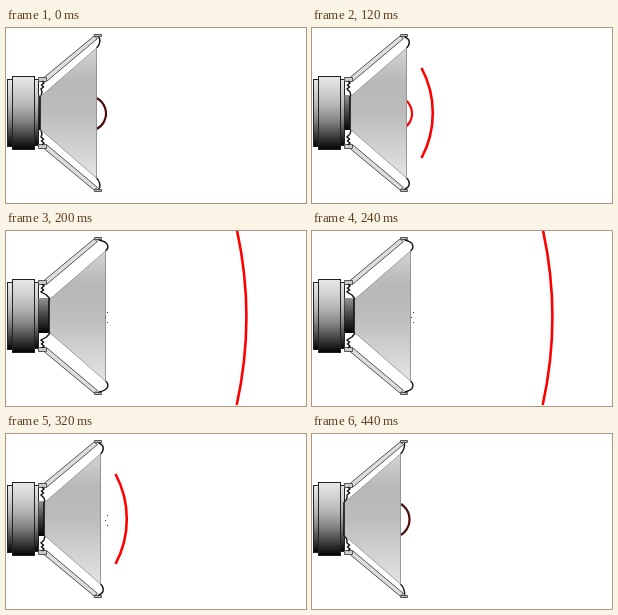
Write an HTML page with a canvas that moves like this. It is 300x175 px and loops after 480 ms.

```html
<!DOCTYPE html>
<html lang="en">
<head>
<meta charset="utf-8">
<title>Loudspeaker</title>
<style>
html, body { margin: 0; width: 100%; height: 100%; overflow: hidden; background: #fff; }
canvas { display: block; width: 300px; height: 175px; }
</style>
</head>
<body>
<canvas id="stage" width="300" height="175"></canvas>
<script>
const g = document.getElementById('stage').getContext('2d');
const STEP = 40, MID = 85;
const RED = '#f00', DARK = '#4a0c0c';

// One row per step: cone edge x, dome tip x, dome colour, wave index
const steps = [
  [91, 100, DARK, 0],
  [93, 100, DARK, 0],
  [95, 100, RED, 1],
  [95, 100, RED, 1],
  [99, 100, RED, 2],
  [100, 0, '', 2],
  [99, 0, '', 2],
  [95, 0, '', 1],
  [95, 0, '', 1],
  [93, 100, DARK, 0],
  [91, 100, DARK, 0],
  [89, 97.5, DARK, 0]
];

// Tip x, depth of the bow, half height, centre y
const waves = [null, [120.8, 11.3, 45, 85], [240.3, 9.6, 88, 86]];

function line(points, color, width = 1) {
  g.beginPath();
  points.forEach(([x, y]) => g.lineTo(x, y));
  g.strokeStyle = color;
  g.lineWidth = width;
  g.stroke();
}

function shape(points, fill, edge) {
  g.beginPath();
  points.forEach(([x, y]) => g.lineTo(x, y));
  g.closePath();
  g.fillStyle = fill;
  g.fill();
  if (edge) {
    g.strokeStyle = edge;
    g.lineWidth = 1;
    g.stroke();
  }
}

function bow(tip, depth, half, cy, color, width) {
  const r = (half * half + depth * depth) / (2 * depth);
  const a = Math.asin(half / r);
  g.beginPath();
  g.arc(tip - r, cy, r, -a, a);
  g.strokeStyle = color;
  g.lineWidth = width;
  g.stroke();
}

function shade(y0, y1, colors) {
  const fill = g.createLinearGradient(0, y0, 0, y1);
  colors.forEach((c, i) => fill.addColorStop(i / (colors.length - 1), c));
  return fill;
}

function mirrored(draw) {
  draw();
  g.save();
  g.translate(0, 2 * MID);
  g.scale(1, -1);
  draw();
  g.restore();
}

function block(x, y, w, h) {
  g.fillStyle = shade(y, y + h, ['#e8e8e8', '#d2d2d2', '#b4b4b4', '#858585', '#444', '#000']);
  g.fillRect(x, y, w, h);
  g.strokeStyle = '#222';
  g.lineWidth = 1;
  g.strokeRect(x + 0.5, y + 0.5, w - 1, h - 1);
}

function frameHalf(edge) {
  const neck = edge - 57;
  // basket
  shape([[38, 49.5], [88, 8], [91.5, 10.5], [41, 53]], '#ddd', '#555');
  shape([[32.5, 49.5], [40.5, 49.5], [40.5, 53.5], [32.5, 53.5]], '#ccc', '#555');
  shape([[88.5, 6.5], [95.5, 6.5], [95.5, 8.5], [88.5, 8.5]], '#bbb', '#555');
  // spider
  line([[36, 53], [38, 55], [35.5, 57], [37.5, 59], [35, 61], [(neck + 38) / 2, 64], [neck + 1, 68]], '#111', 1.4);
  // surround
  g.beginPath();
  g.moveTo(92.5, 9);
  g.bezierCurveTo(edge + 4, 11, edge + 3, 17, edge - 0.5, 20);
  g.strokeStyle = '#111';
  g.lineWidth = 1.4;
  g.stroke();
}

function draw([edge, tip, tint, wave]) {
  const neck = edge - 57;
  g.fillStyle = '#fff';
  g.fillRect(0, 0, 300, 175);

  if (tip) bow(tip, tip - 90.5 + (edge < 90 ? 1.5 : 0), 15.5, 85.5, tint, 2.2);

  block(1, 51, 6, 68);
  block(28, 51, 5, 67);
  block(6, 48, 23, 74);

  g.fillStyle = shade(66, 103, ['#999', '#444', '#000']);
  g.fillRect(32.5, 67, neck - 32, 35);

  mirrored(() => frameHalf(edge));

  const cone = shade(20, 150, ['#d4d4d4', '#b8b8b8', '#bcbcbc', '#d0d0d0', '#e4e4e4']);
  shape([[neck, 69], [edge, 20], [edge, 150], [neck, 101]], cone);
  line([[neck, 69], [edge - 0.5, 20], [edge - 0.5, 150], [neck, 101]], '#888', 0.8);
  line([[neck, 68], [neck, 102]], '#111', 1.6);

  // specks left in front of the cone
  if (!tip) {
    g.fillStyle = '#333';
    [81, 86, 91].forEach((y, i) => g.fillRect(i === 1 ? 99 : 101, y, 1, 1));
  }

  if (wave) bow(...waves[wave], RED, 2.6);
}

let shown = -1;
function tick() {
  const i = Math.floor(performance.now() / STEP) % steps.length;
  if (i !== shown) draw(steps[shown = i]);
  requestAnimationFrame(tick);
}
tick();
</script>
</body>
</html>
```
